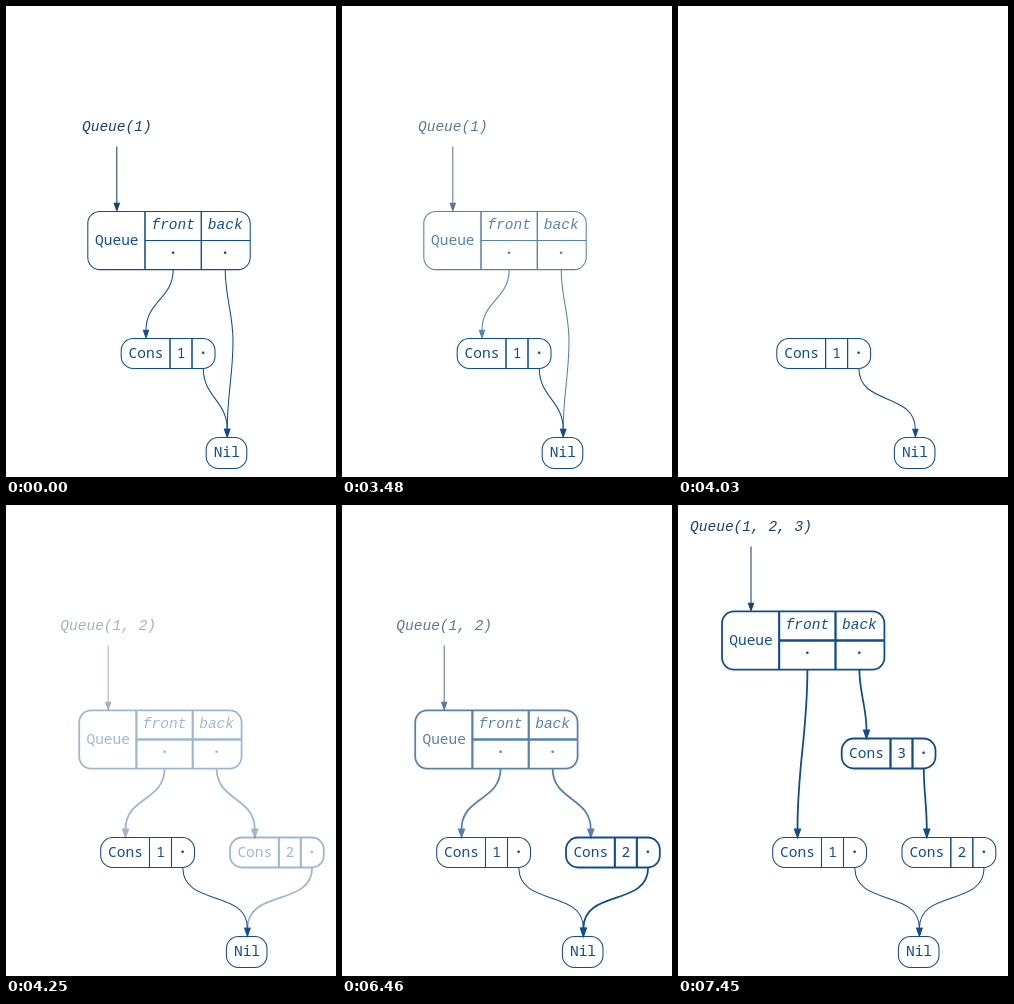
Write an HTML page that moves like this. It is 330 px wide and 471 px high and loops after 8000 ms.

```html
<!DOCTYPE html>
<html lang="en">
<head>
<meta charset="utf-8">
<title>Persistent queue</title>
<style>
  html, body { margin: 0; height: 100%; overflow: hidden; background: #fff; }
  svg { display: block; width: 100vw; height: 100vh; color: #104e8b; stroke: currentColor; fill: none; }
  text { font: 14.5px "Noto Sans Mono", monospace; text-anchor: middle; fill: currentColor; stroke: none; }
  .italic { font-family: "Liberation Mono", monospace; font-style: italic; }
  .dot { font-weight: 700; }
  .title { color: #1a3f66; }
  .head { fill: currentColor; }
</style>
</head>
<body>
<svg id="stage" viewBox="0 0 330 471"></svg>
<script>
const LOOP = 8000, STEP = 110, STEPS = 10;
const THIN = 1.05, BOLD = 1.8;
const RADIUS = 12, ROW = 99, CONS_TOP = 332.5, HEAD = 7.5;
const stage = document.getElementById('stage');

const clamp = v => Math.min(1, Math.max(0, v));
const mix = (a, b, k) => a + (b - a) * k;

const text = (x, y, s, cls = '') => `<text x="${x}" y="${y}" class="${cls}">${s}</text>`;
const dot = (x, y) => text(x, y, '·', 'dot');
const box = (x, y, w, h) => `<rect x="${x}" y="${y}" width="${w}" height="${h}" rx="${RADIUS}"/>`;
const line = d => `<path d="${d}"/>`;
// Neighbouring cells each draw their shared border.
const divider = d => line(d).repeat(2);
const group = (opacity, weight, content, cls = '') => opacity > 0
  ? `<g opacity="${opacity}" stroke-width="${weight}" class="${cls}">${content}</g>` : '';

// Arrow through the given points, vertical at each of them; wider spans bend harder.
function edge(...points) {
  const tip = points.pop();
  points.push({ x: tip.x, y: tip.y - HEAD });
  let d = `M${points[0].x},${points[0].y}`;
  for (let i = 1; i < points.length; i++) {
    const a = points[i - 1], b = points[i];
    const bend = (b.y - a.y) * (0.36 + 0.0045 * Math.abs(b.x - a.x));
    d += `C${a.x},${a.y + bend},${b.x},${b.y - bend},${b.x},${b.y}`;
  }
  return line(d) + `<path class="head" d="M${tip.x},${tip.y}l-2.6,${-HEAD}h5.2Z"/>`;
}

// Each node has its drawing and the points where edges attach.
function cons(x, y, value) {
  return {
    svg: box(x, y, 93.8, 30) + divider(`M${x + 48.8},${y}v30m22,0v-30`) +
      text(x + 24.8, y + 19.5, 'Cons') + text(x + 59.8, y + 19.5, value) + dot(x + 81.8, y + 19.5),
    top: { x: x + 24.8, y: y - 0.7 },
    tail: { x: x + 82.1, y: y + 30 }
  };
}

function nil(x) {
  const y = CONS_TOP + ROW;
  return {
    svg: box(x - 20.3, y, 40.6, 31) + text(x + 0.3, y + 19.5, 'Nil'),
    top: { x: x + 0.7, y: y - 0.7 }
  };
}

function queue(x, y) {
  const front = x + 85.4, back = x + 137.4, bottom = y + 58.2;
  return {
    svg: box(x, y, 162.4, 58.2) +
      divider(`M${x + 57.2},${y}v58.2M${x + 113.5},${y}v58.2M${x + 57.2},${y + 29.1}h105.2`) +
      text(x + 29, y + 33.2, 'Queue') +
      text(front, y + 18, 'front', 'italic') + text(back, y + 18, 'back', 'italic') +
      dot(front, y + 47) + dot(back, y + 47),
    top: { x: x + 29, y: y - 0.7 },
    front: { x: front, y: bottom },
    back: { x: back, y: bottom }
  };
}

// Title, its arrow and a queue node with everything that appears with it.
function version(opacity, weight, title, node, ...extras) {
  const { x, y } = node.top;
  return group(opacity, THIN,
      text(x, y - 79.7, title, 'italic') + edge({ x, y: y - 64.3 }, { x, y }), 'title') +
    group(opacity, weight, node.svg + extras.join(''));
}

// Fade out, move and fade in share a transition in equal thirds.
const phases = p => ({ out: 1 - clamp(3 * p), move: clamp(3 * p - 1), in: clamp(3 * p - 2) });
const progress = (t, start) => clamp(Math.floor((t - start) / STEP) / STEPS);

function draw(a, b) {
  const q1 = queue(81.8, 205.4), q2 = queue(73.2, 205.4), q3 = queue(44, 205.4 - ROW);
  const one = cons(mix(115.2, 94.7, a.move), CONS_TOP, 1);
  const two = cons(224, CONS_TOP, 2);
  const three = cons(163.7, CONS_TOP - ROW, 3);
  const end = nil(mix(220.5, 240.7, a.move));
  const detour = { x: 227, y: 335 };

  return version(a.out, THIN, 'Queue(1)', q1,
      edge(q1.front, one.top), edge(q1.back, detour, end.top)) +
    version(Math.min(a.in, b.out), BOLD, 'Queue(1, 2)', q2,
      edge(q2.front, one.top), edge(q2.back, two.top)) +
    version(b.in, BOLD, 'Queue(1, 2, 3)', q3,
      edge(q3.front, one.top), edge(q3.back, three.top), three.svg, edge(three.tail, two.top)) +
    group(1, THIN, one.svg + edge(one.tail, end.top) + end.svg) +
    group(a.in, mix(BOLD, THIN, b.move), two.svg + edge(two.tail, end.top));
}

let shown;
function frame() {
  const t = performance.now() % LOOP;
  const first = progress(t, 3370), second = progress(t, 6350);
  if (shown !== first + second) {
    shown = first + second;
    stage.innerHTML = draw(phases(first), phases(second));
  }
  requestAnimationFrame(frame);
}
frame();
</script>
</body>
</html>
```
